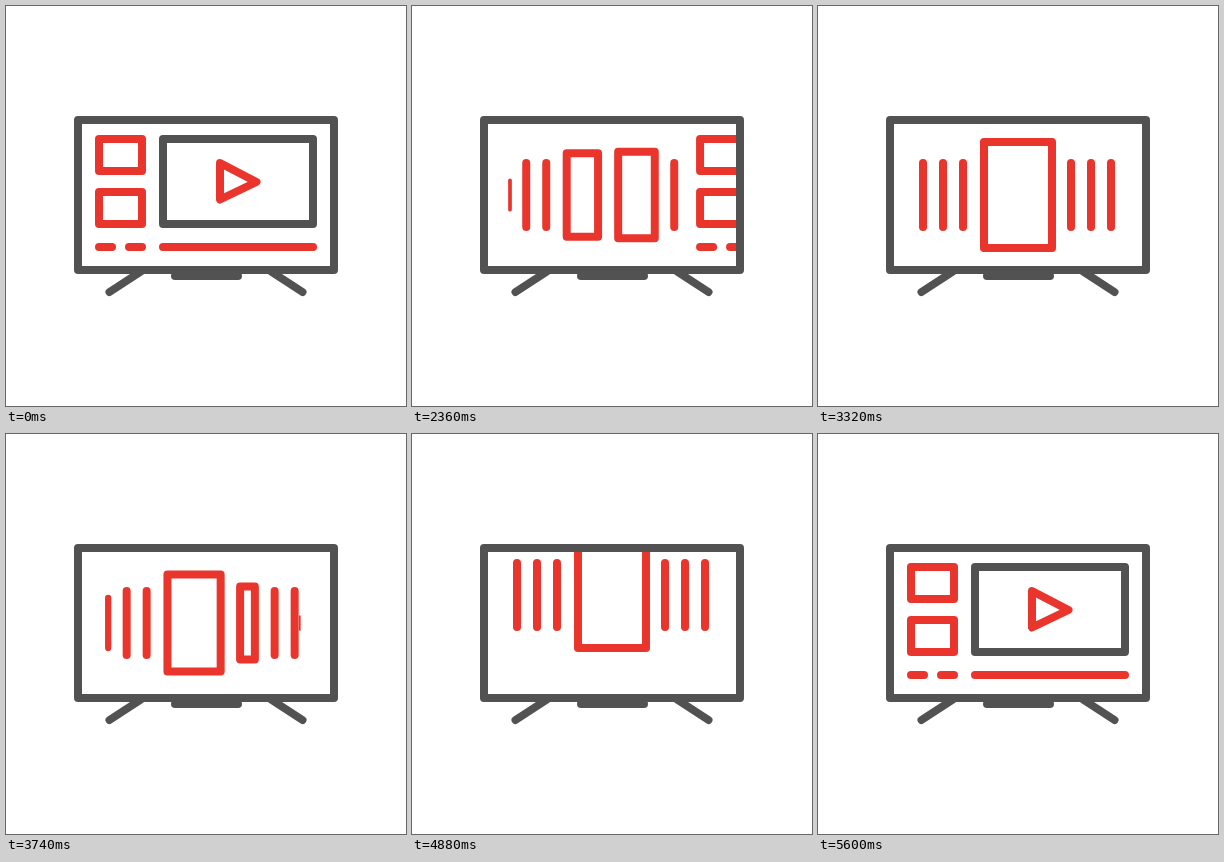
Animation, 400 px wide and 400 px high, one loop 5660 ms. Source, as an HTML page with a canvas:

```html
<!DOCTYPE html>
<html lang="en">
<head>
<meta charset="utf-8">
<title>TV menu</title>
<style>
html, body { margin: 0; width: 100%; height: 100%; overflow: hidden; background: #fff; }
canvas { display: block; width: 400px; height: 400px; }
</style>
</head>
<body>
<canvas id="stage" width="400" height="400"></canvas>
<script>
const ctx = document.getElementById('stage').getContext('2d');
const LOOP = 5660, GRAY = '#525252', RED = '#e9352c';
const progress = (t, start, duration) => Math.min(1, Math.max(0, (t - start) / duration));
const ease = p => p < .5 ? 2 * p * p : 1 - 2 * (1 - p) * (1 - p);
const move = (t, start, duration) => ease(progress(t, start, duration));

function path(color, points, closed) {
  ctx.strokeStyle = color;
  ctx.beginPath();
  points.forEach(([x, y]) => ctx.lineTo(x, y));
  if (closed) ctx.closePath();
  ctx.stroke();
}
const line = (color, x1, y1, x2, y2) => path(color, [[x1, y1], [x2, y2]]);
const box = (color, x1, y1, x2, y2) =>
  path(color, [[x1, y1], [x2, y1], [x2, y2], [x1, y2]], true);

function drawTv() {
  box(GRAY, 72, 114, 328, 264);
  line(GRAY, 169, 270, 232, 270);
  line(GRAY, 103.5, 286, 135, 265.5);
  line(GRAY, 296.5, 286, 265, 265.5);
}

function drawPlayer() {
  box(RED, 93, 133, 136, 165);
  box(RED, 93, 186, 136, 218);
  line(RED, 93, 241, 106, 241);
  line(RED, 123, 241, 136, 241);
  line(RED, 157, 241, 307, 241);
  box(GRAY, 157, 133, 307, 218);
  path(RED, [[214, 157], [250.5, 176], [214, 193.5]], true);
}

// Slot 0 is the open cover, slots 1 to 3 on either side are covers seen edge-on.
function drawCover(slot, press) {
  const d = Math.abs(slot), side = slot < 0 ? -1 : 1;
  if (d >= 4) return;
  const fold = Math.min(d, 1), out = Math.max(0, d - 3);
  const x = 200 + fold * (side < 0 ? -55 : 53)
    + side * 20 * Math.min(2, Math.max(0, d - 1))
    + out * (side < 0 ? -13 : 1);
  const w = 34 * (1 - fold) * press, h = (53 - 21 * fold) * press;
  ctx.save();
  ctx.translate(x, 189);
  ctx.scale(1 - out, 1 - out);
  if (w < .1) line(RED, 0, -h, 0, h);
  else box(RED, -w, -h, w, h);
  ctx.restore();
}

function drawCarousel(t) {
  const shift = -7 + 7 * move(t, 2000, 540)
    + move(t, 2540, 270) + move(t, 3050, 270) + move(t, 3560, 270);
  const press = 1 - .14 * Math.sin(Math.PI * progress(t, 4280, 420));
  ctx.save();
  ctx.translate(0, -145 * move(t, 4760, 390));
  for (let i = -6; i <= 3; i++) drawCover(i + shift, press);
  ctx.restore();
}

function draw(t) {
  ctx.clearRect(0, 0, 400, 400);
  ctx.lineWidth = 8;
  ctx.lineCap = ctx.lineJoin = 'round';
  ctx.save();
  ctx.beginPath();
  ctx.rect(76, 118, 248, 142);
  ctx.clip();
  if (t > 2000 && t < 5150) drawCarousel(t);
  if (t < 2540) {
    ctx.save();
    ctx.translate(250 * move(t, 2000, 540), 0);
    drawPlayer();
    ctx.restore();
  } else if (t > 5060) {
    const size = move(t, 5060, 540);
    ctx.save();
    ctx.translate(200, 187);
    ctx.scale(size, size);
    ctx.translate(-200, -187);
    drawPlayer();
    ctx.restore();
  }
  ctx.restore();
  drawTv();
}

const begin = performance.now();
function tick() {
  draw((performance.now() - begin) % LOOP);
  requestAnimationFrame(tick);
}
tick();
</script>
</body>
</html>
```
